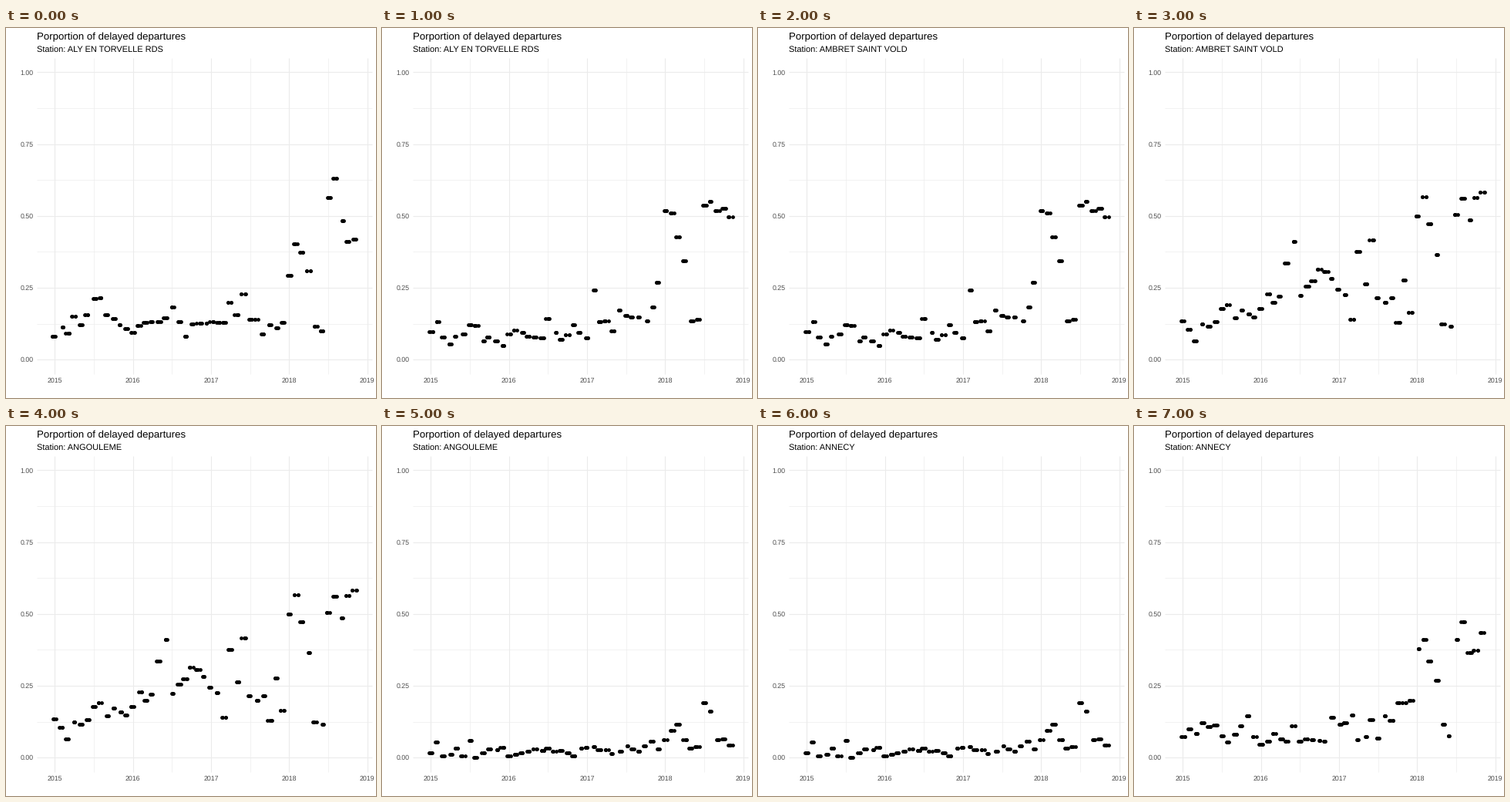
Animation of 480 by 480 pixels, one loop 8 s. Source, as a matplotlib script:

```python
import numpy as np
import matplotlib.pyplot as plt
from matplotlib.animation import FuncAnimation

SIZE, DPI = 480, 100
PT = 72 / DPI  # points per pixel
LEFT, RIGHT, TOP, BOTTOM = 40.3, 474.6, 38.8, 448.8
X0, DAY_PX = 63.3, 405.3 / 1461
Y0, UNIT_PX = 430.2, 372.9
JITTER_PX, REPEATS = 3.1, 4

plt.rcParams["font.family"] = "Liberation Sans"
plt.rcParams["text.hinting"] = "none"

# Monthly share of late trains, in thousandths, January 2015 to November 2018
FIRST = [
    80, 112, 92, 150, 121, 156, 212, 215, 156, 144, 120, 108,
    94, 118, 128, 133, 133, 145, 184, 131, 81, 123, 127, 127,
    132, 128, 129, 200, 156, 229, 140, 140, 89, 122, 111, 130,
    292, 402, 374, 310, 115, 100, 564, 631, 484, 411, 420]
SECOND = [
    97, 132, 79, 54, 82, 90, 121, 119, 66, 77, 65, 50,
    90, 103, 95, 80, 79, 76, 144, 94, 71, 87, 122, 94,
    76, 243, 132, 134, 99, 172, 153, 149, 147, 135, 182, 270,
    519, 509, 427, 345, 135, 140, 537, 549, 518, 526, 496]
THIRD = [
    135, 104, 65, 125, 115, 132, 178, 192, 146, 171, 160, 149,
    177, 229, 200, 220, 336, 411, 224, 255, 273, 313, 306, 283,
    244, 227, 141, 375, 263, 415, 216, 200, 216, 128, 278, 163,
    500, 567, 473, 366, 125, 116, 505, 560, 485, 565, 583]
FOURTH = [
    16, 55, 6, 11, 33, 6, 59, 0, 16, 31, 27, 36,
    6, 11, 16, 22, 29, 26, 33, 23, 26, 16, 6, 34,
    36, 39, 28, 28, 13, 22, 42, 29, 22, 41, 58, 31,
    61, 94, 116, 63, 34, 39, 190, 161, 61, 65, 43]
FIFTH = [
    72, 101, 85, 122, 107, 112, 76, 55, 81, 111, 145, 72,
    45, 57, 83, 65, 58, 110, 56, 65, 61, 59, 56, 140,
    116, 120, 147, 61, 74, 133, 68, 146, 129, 192, 191, 200,
    379, 412, 337, 270, 115, 76, 410, 473, 364, 372, 434]

SERIES = [FIRST, SECOND, THIRD, FOURTH, FIFTH]
STATIONS = ["ALY EN TORVELLE RDS", "AMBRET SAINT VOLD", "ANGOULEME", "ANNECY"]

months = np.arange("2015-01", "2018-12", dtype="datetime64[M]")
days = (months.astype("datetime64[D]") - np.datetime64("2015-01-01")).astype(int)


def spread(values, seed):
    """Pixel positions of the points, jittered sideways around each month."""
    rng = np.random.default_rng(seed)
    offset = rng.uniform(-JITTER_PX, JITTER_PX, (len(days), REPEATS))
    x = X0 + days[:, None] * DAY_PX + offset
    y = Y0 - np.array(values) / 1000 * UNIT_PX
    return x.ravel(), np.repeat(y, REPEATS)


clouds = [spread(values, seed) for seed, values in enumerate(SERIES)]

fig = plt.figure(figsize=(SIZE / DPI, SIZE / DPI), dpi=DPI, facecolor="white")
ax = fig.add_axes([0, 0, 1, 1])
ax.set(xlim=(0, SIZE), ylim=(SIZE, 0))
ax.axis("off")


def label(x, y, text, px, color="black", ha="left"):
    return ax.text(x, y, text, fontsize=px * PT, color=color, ha=ha, va="baseline")


def grid(xs, ys, width):
    style = dict(color="#ebebeb", lw=width * PT, solid_capstyle="butt", zorder=1)
    for y in ys:
        ax.plot([LEFT, RIGHT], [y, y], **style)
    for x in xs:
        ax.plot([x, x], [TOP, BOTTOM], **style)


year_days = np.array([0, 365, 731, 1096, 1461])
years = X0 + year_days * DAY_PX
levels = Y0 - np.arange(5) / 4 * UNIT_PX
grid((years[1:] + years[:-1]) / 2, (levels[1:] + levels[:-1]) / 2, 0.6)
grid(years, levels, 1.1)

for i in range(5):
    label(years[i], 460, str(2015 + i), 8.8, "#4d4d4d", "center")
    label(35.6, levels[i] + 3.2, f"{i / 4:.2f}", 8.8, "#4d4d4d", "right")

label(40.3, 15, "Porportion of delayed departures", 13.2)
subtitle = label(40.3, 32, "", 11)
points, = ax.plot([], [], "o", color="black", ms=4.8 * PT, mew=0, zorder=2)


def draw(second):
    # The points change one second before the station name catches up
    points.set_data(*clouds[(second + 1) // 2])
    subtitle.set_text("Station: " + STATIONS[second // 2])
    return points, subtitle


anim = FuncAnimation(fig, draw, frames=8, interval=1000, repeat=True, repeat_delay=0)
plt.show()
```
